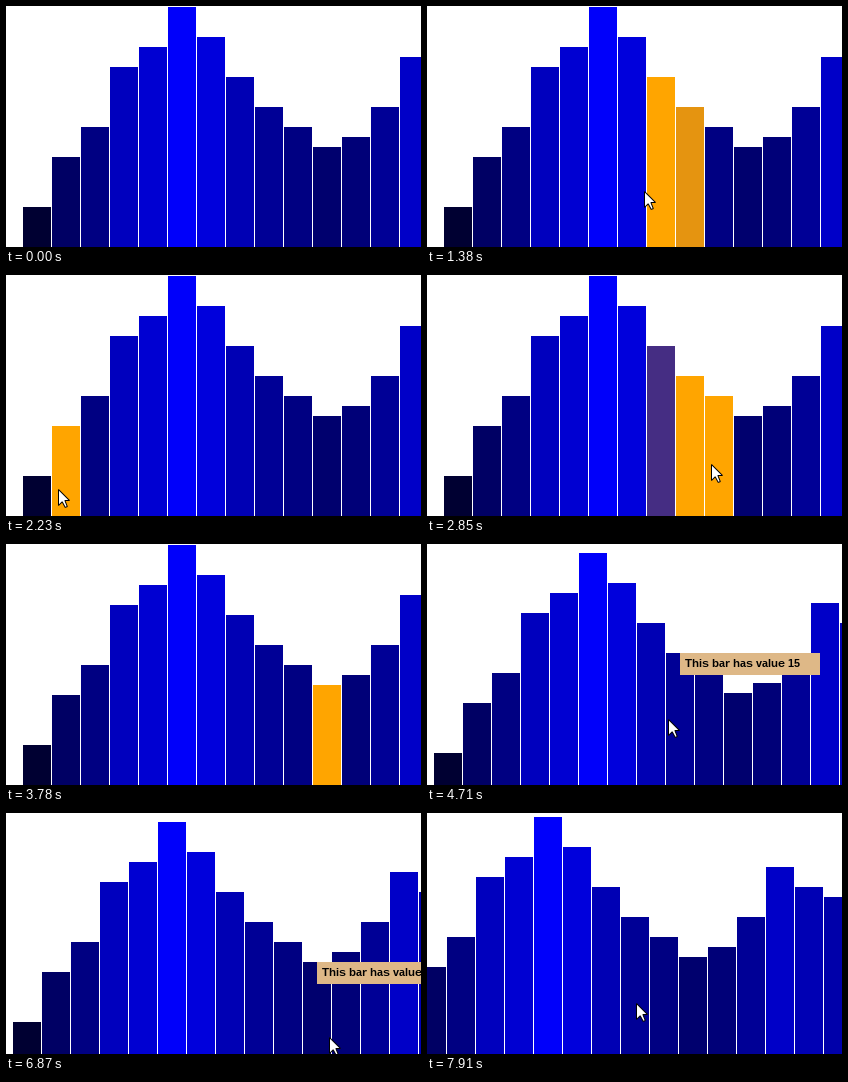
Recreate the animation shown at these times as a matplotlib script. Size 415 by 241 pixels, loop 8 s.

```python
import matplotlib.pyplot as plt
import numpy as np
from matplotlib.animation import FuncAnimation
from matplotlib.patches import Polygon, Rectangle

W, H, DPI = 415, 241, 64
PX = 72 / DPI                       # one pixel in points
LOOP, STEP = 8000, 20
TICK = 77.4                         # time between screen updates, ms
PITCH, BAR_W = 29, 28
LAG, FADE = 15, 250                 # hover delay and fade time, ms

DATA = np.array([5, 10, 13, 19, 21, 25, 22, 18, 15, 13,
                 11, 12, 15, 20, 18, 17, 16, 18, 23, 25])
ORANGE = np.array([255, 165, 0]) / 255
BLUES = np.array([(0, 0, d * 10 / 255) for d in DATA])

# Each glide is (start time, end time, target x, target y).
SCENES = [
    dict(start=-14, left=17, base=251, mode="highlight",
         visit=(745, 3745), entry=(325, 240),
         glides=[(745, 810, 252, 179), (1281, 2050, 52, 214),
                 (2510, 2560, 219, 196), (2560, 3160, 326, 185),
                 (3530, 3745, 334, 241)]),
    dict(start=4250, left=7, base=259, mode="tooltip",
         visit=(4550, 7100), entry=(367, 198),
         glides=[(4550, 4710, 241, 175), (4840, 5240, 140, 172),
                 (5470, 5720, 101, 180), (5930, 6180, 192, 178),
                 (6190, 6870, 328, 226)]),
    dict(start=7600, left=-38, base=254, mode="plain",
         visit=(7825, LOOP + 100), entry=(242, 201),
         glides=[(7825, 7905, 209, 190)]),
]

ARROW = np.array([(0.5, 0.5), (0.5, 16.5), (4.2, 12.8), (7.2, 18.4),
                  (9.3, 17.6), (6.9, 11.5), (11.5, 11.5)])

# whole-pixel glyph advances, as in a browser
plt.rcParams["text.hinting"] = "native"
plt.rcParams["text.hinting_factor"] = 1


def cursor_at(t, scene):
    """Pointer position; y is below the stage while it is away."""
    t = np.asarray(t, float)
    px, py = scene["entry"]
    x, y = px, py
    for t0, t1, gx, gy in scene["glides"]:
        u = np.clip((t - t0) / (t1 - t0), 0, 1)
        e = 1 - (1 - u) ** 1.4
        x, y = x + (gx - px) * e, y + (gy - py) * e
        px, py = gx, gy
    enter, leave = scene["visit"]
    return x, np.where((t >= enter) & (t < leave), y, H + 50)


def bar_under(x, y, left):
    """Index of the bar below the pointer, -1 for none."""
    return np.where(y < H, (x - left) // PITCH, -1).astype(int)


def ease(u):
    return 4 * u ** 3 if u < 0.5 else 1 - 4 * (1 - u) ** 3


def hover_colors(t, scene):
    """Hovered bars are orange, bars just left fade back to blue."""
    colors = BLUES.copy()
    now = t - LAG
    times = np.arange(now - FADE, now + 1, 2)
    hit = bar_under(*cursor_at(times, scene), scene["left"])
    for i in set(hit[hit >= 0]):
        age = now - times[hit == i][-1]
        u = ease(min(max(age - 2, 0) / FADE, 1))
        colors[i] = ORANGE + (BLUES[i] - ORANGE) * u
    return colors


fig = plt.figure(figsize=(W / DPI, H / DPI), dpi=DPI, facecolor="white")
ax = fig.add_axes([0, 0, 1, 1])
ax.set_xlim(0, W)
ax.set_ylim(H, 0)
ax.axis("off")

bars = [ax.add_patch(Rectangle((0, 0), BAR_W, d * 10, lw=0, antialiased=False))
        for d in DATA]
tip_box = ax.add_patch(Rectangle((0, 0), 140, 22, lw=0, fc="burlywood",
                                 antialiased=False, zorder=3))
tip_text = ax.text(0, 0, "", family="Liberation Sans", weight="bold",
                   size=11 * PX, color="black", va="baseline", zorder=4)
arrow = ax.add_patch(Polygon(ARROW, closed=True, fc="white", ec="black",
                             lw=PX, joinstyle="miter", zorder=5))


def draw(n):
    now = n * STEP + 15
    scene = [s for s in SCENES if s["start"] <= now][-1]
    start, left, base = scene["start"], scene["left"], scene["base"]
    t = start + (now - start) // TICK * TICK
    x, y = np.round(cursor_at(t, scene))

    colors = hover_colors(t, scene) if scene["mode"] == "highlight" else BLUES
    for i, bar in enumerate(bars):
        bar.set_xy((left + i * PITCH, base - DATA[i] * 10))
        bar.set_facecolor(colors[i])

    i = int(bar_under(x, y, left))
    shown = scene["mode"] == "tooltip" and i >= 0
    tip_box.set_visible(shown)
    tip_text.set_visible(shown)
    if shown:
        tx, ty = left + i * PITCH + 14, base - DATA[i] * 10
        tip_box.set_xy((tx, ty))
        tip_text.set_position((tx + 5, ty + 14))
        tip_text.set_text(f"This bar has value {DATA[i]}")

    arrow.set_xy(ARROW + (x, y))
    arrow.set_visible(bool(y < H))
    return [*bars, tip_box, tip_text, arrow]


anim = FuncAnimation(fig, draw, frames=LOOP // STEP, interval=STEP,
                     repeat=True, repeat_delay=0, blit=False)
plt.show()
```
